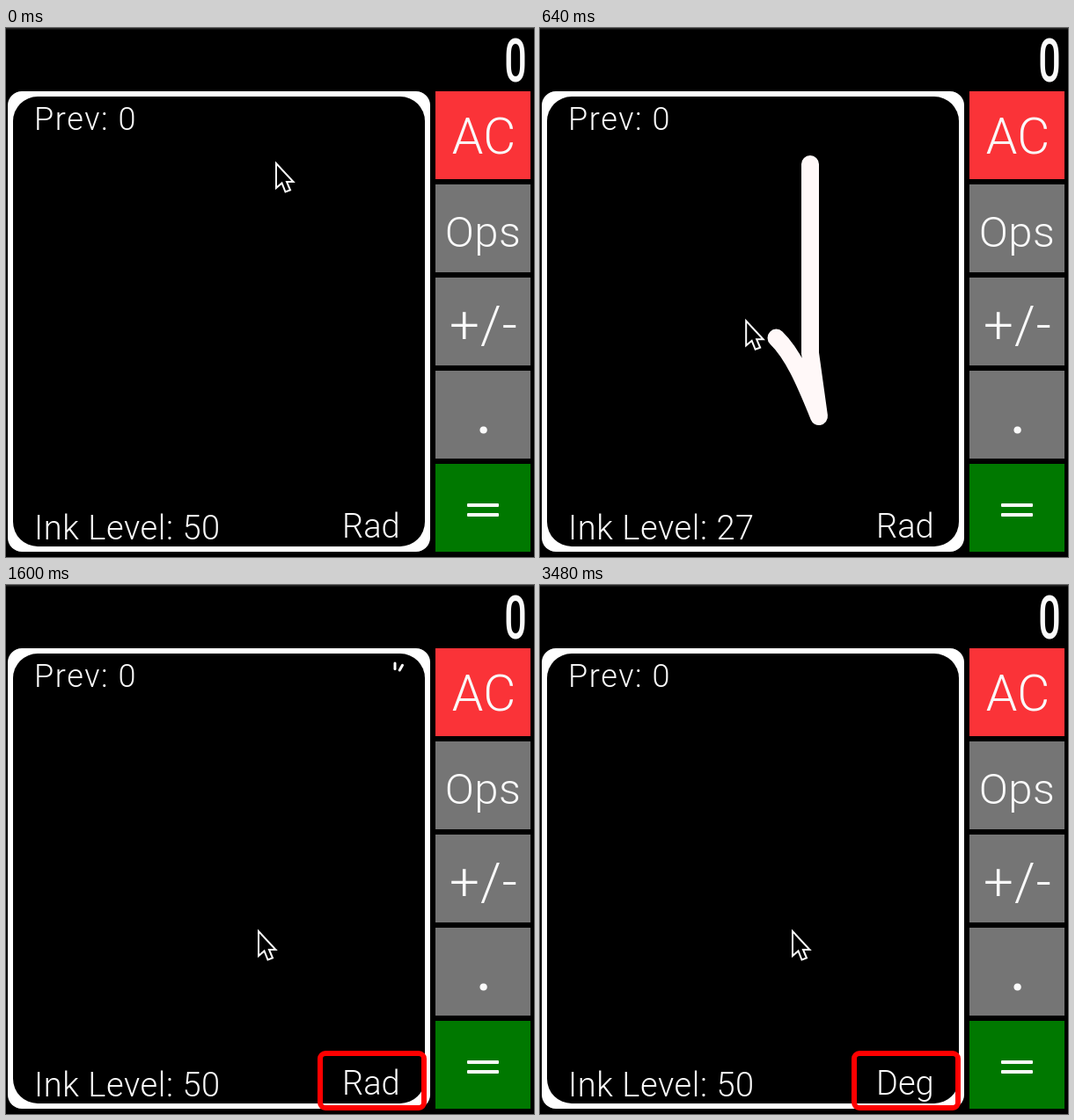
These frames come from a looping animation (600 by 602 pixels, 3.52 s). An HTML page with a canvas:

```html
<!DOCTYPE html>
<html lang="en">
<meta charset="utf-8">
<title>Calculator</title>
<style>
html, body { margin: 0; width: 100%; height: 100%; overflow: hidden; background: #000 }
canvas { display: block }
</style>
<canvas id="stage" width="600" height="602"></canvas>
<script>
const ctx = document.getElementById('stage').getContext('2d');
const LOOP = 3520, STEP = 40;
const PRESS = 238, RELEASE = 1120, CLEAR = 1320, WAIT = 1480, SWITCH = 2880;

const route = 'M307 155V370L317 442C290 375 272 338 226 333H190C166 355 159 385 159 425L237 452C270 440 280 415 287 395';
const stroke = new Path2D(route);
const track = document.createElementNS('http://www.w3.org/2000/svg', 'path');
track.setAttribute('d', route);

// pen pace: time, distance along the route
const pace = [[PRESS, 0], [291, 225], [440, 288], [600, 390], [680, 469],
  [880, 569], [920, 652], [1080, track.getTotalLength()]];
const cursor = new Path2D('M1 3V31L7.5 25.5 11.5 35.5 17 33.5 13 24H20.5Z');

function distance(t) {
  const i = pace.findIndex(p => p[0] > t);
  if (i < 1) return i ? track.getTotalLength() : 0;
  const [t0, d0] = pace[i - 1], [t1, d1] = pace[i];
  return d0 + (d1 - d0) * (t - t0) / (t1 - t0);
}

function box(x, y, w, h, r, color) {
  ctx.fillStyle = color;
  ctx.beginPath();
  ctx.roundRect(x, y, w, h, r);
  ctx.fill();
}

function text(str, x, y, size, align = 'left', spacing = 0, weight = 300) {
  ctx.font = `${weight} ${size}px Roboto, sans-serif`;
  ctx.letterSpacing = spacing + 'px';
  ctx.textAlign = align;
  ctx.fillStyle = '#fafafa';
  ctx.fillText(str, x, y);
}

function drawKeys() {
  ['#fa3338', '#757575', '#757575', '#757575', '#007800']
    .forEach((color, i) => box(488, 72 + i * 106, 108, 100, 0, color));
  text('AC', 543, 143, 57, 'center');
  text('Ops', 542, 249, 49, 'center', 0.5);
  text('+/-', 543, 358, 60, 'center', 1);
  text('.', 543, 461, 74, 'center', 0, 400);
  for (const y of [541, 552]) box(524, y, 36, 4, 1, '#fafafa');
}

function drawPanel(ink, mode) {
  box(2, 72, 480, 524, 16, '#fff');
  box(8, 78, 468, 512, 28, '#000');
  text('Prev: 0', 32, 116, 36, 'left', 1.6);
  text('Ink Level: ' + ink, 32, 582, 38, 'left', 0.6);
  text(mode, 382, 580, 38);
}

function drawDisplay() {
  ctx.save();
  ctx.translate(579, 61);
  ctx.scale(0.65, 1); // the display uses tall, narrow digits
  text('0', 0, 0, 69, 'center', 0, 500);
  ctx.restore();
}

function drawStroke(length) {
  ctx.save();
  ctx.setLineDash([length, 2000]);
  ctx.lineWidth = 20;
  ctx.lineCap = ctx.lineJoin = 'round';
  ctx.strokeStyle = '#fff8f8';
  ctx.stroke(stroke);
  ctx.restore();
}

function drawSpinner(age) {
  const head = Math.floor(age / 112);
  ctx.save();
  ctx.translate(442, 106);
  ctx.strokeStyle = '#fff';
  ctx.lineWidth = 3;
  ctx.lineCap = 'round';
  for (let i = 0; i < 12 && i <= head; i++) {
    const behind = (head - i) % 12, a = i * Math.PI / 6;
    ctx.globalAlpha = Math.min(1, 0.2 + (11 - behind) * 0.14);
    ctx.beginPath();
    ctx.moveTo(10.5 * Math.sin(a), -10.5 * Math.cos(a));
    ctx.lineTo(17 * Math.sin(a), -17 * Math.cos(a));
    ctx.stroke();
  }
  ctx.restore();
}

function drawCursor({ x, y }) {
  ctx.save();
  ctx.translate(x - 1, y - 4);
  ctx.fillStyle = '#000';
  ctx.fill(cursor);
  ctx.lineWidth = 2;
  ctx.strokeStyle = '#fff';
  ctx.stroke(cursor);
  ctx.restore();
}

function draw(t) {
  const drawing = t > PRESS && t < CLEAR;
  const ink = drawing ? 50 - Math.round((Math.min(t, RELEASE) - 226) / 18.2) : 50;
  box(0, 0, 600, 602, 0, '#000');
  box(0, 0, 600, 1.5, 0, '#222');
  drawDisplay();
  drawKeys();
  drawPanel(ink, t < SWITCH ? 'Rad' : 'Deg');
  // the ink trails the pointer by one step
  if (drawing && t > PRESS + STEP) drawStroke(distance(t - STEP));
  if (t >= WAIT && t < SWITCH) drawSpinner(t - WAIT);
  if (t >= CLEAR) {
    ctx.strokeStyle = '#f00';
    ctx.lineWidth = 6;
    ctx.beginPath();
    ctx.roundRect(357, 533, 118, 62, 6);
    ctx.stroke();
  }
  drawCursor(track.getPointAtLength(distance(t)));
}

const start = performance.now();
function tick() {
  const t = (performance.now() - start) % LOOP;
  draw(Math.floor(t / STEP) * STEP);
  requestAnimationFrame(tick);
}
tick();
</script>
</html>
```
